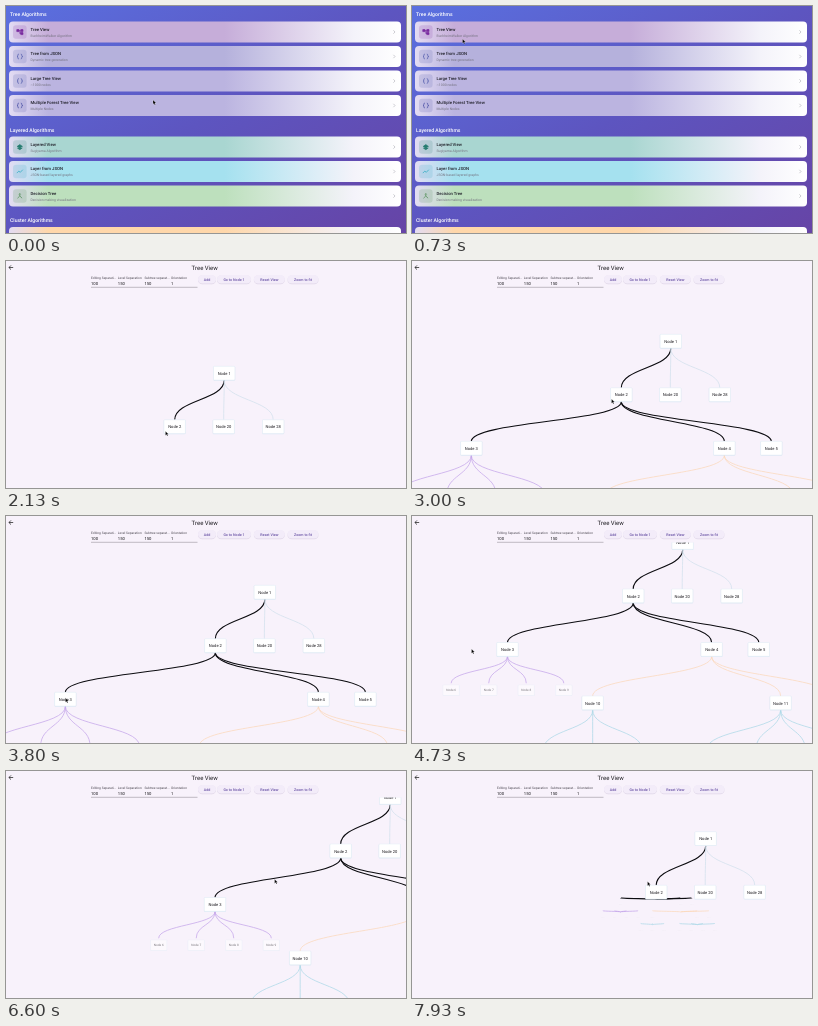
These frames come from a looping animation (400x227 px, 8000 ms). An HTML page:

```html
<!DOCTYPE html>
<html lang="en">
<head>
<meta charset="utf-8">
<title>Tree View</title>
<style>
  html, body { margin: 0; width: 100%; height: 100%; overflow: hidden; background: #f8f2fb; }
  svg { display: block; width: 100%; height: 100%; }
  text { font-family: Roboto, sans-serif; text-rendering: geometricPrecision; }
</style>
</head>
<body>
<svg id="stage" viewBox="0 0 400 227">
  <defs>
    <linearGradient id="sky" x1="0" y1="0" x2="1" y2="1">
      <stop offset="0" stop-color="#5a70e0"/>
      <stop offset=".5" stop-color="#5d55c0"/>
      <stop offset="1" stop-color="#6644a6"/>
    </linearGradient>
    <clipPath id="view"><rect y="26.5" width="400" height="201"/></clipPath>
  </defs>
  <g id="list"><rect width="400" height="227" fill="url(#sky)"/></g>
  <g id="page">
    <rect width="460" height="227" fill="#f8f2fb"/>
    <g clip-path="url(#view)"><g id="edges"></g><g id="nodes"></g></g>
    <path d="M7.2 6.5H3M5 4.4L2.9 6.5L5 8.6" fill="none" stroke="#222" stroke-width=".75"/>
  </g>
  <path id="cursor" d="M0 0V4.3L1 3.4L1.7 4.9L2.5 4.5L1.8 3.1H3.1Z" fill="#000" stroke="#fff" stroke-width=".25"/>
</svg>
<script>
const LOOP = 8000, TOGGLE = 550, LEVEL = 53.5;
const $ = id => document.getElementById(id);

function add(parent, tag, attrs, text) {
  const el = document.createElementNS('http://www.w3.org/2000/svg', tag);
  for (const key in attrs) el.setAttribute(key, attrs[key]);
  if (text) el.textContent = text;
  parent.appendChild(el);
  return el;
}

function label(parent, x, y, size, fill, text, extra) {
  return add(parent, 'text', { x, y, 'font-size': size, fill, ...extra }, text);
}

// Menu page
const icons = {
  tree: 'M-3-2.4h2.2v2h-2.2zM1-2.4h2.2v2H1zM1 .6h2.2v2H1zM-.8-1.4H1M.1-1.4V1.6H1',
  braces: 'M-1-2.4q-1 0-1 1v.6q0 .8-.8.8q.8 0 .8.8v.6q0 1 1 1M1-2.4q1 0 1 1v.6q0 .8.8.8q-.8 0-.8.8v.6q0 1-1 1',
  layers: 'M0-2.4L2.6-.6L0 1.2L-2.6-.6ZM-2.6 .9L0 2.7L2.6 .9',
  chart: 'M-3 1.6L-1-.4L.5 .8L3-1.8',
  split: 'M0-2.4V0L-2.3 2.2M0 0L2.3 2.2M-.8-1.6L0-2.4L.8-1.6'
};
const list = $('list');

function card(y, color, ink, icon, title, subtitle) {
  const id = 'card' + Math.round(y);
  const grad = add(list.ownerSVGElement.querySelector('defs'), 'linearGradient', { id });
  [[0, '#e3dcf3'], [.1, color], [.55, color], [.88, '#f4f3fa'], [1, '#fff']]
    .forEach(([offset, c]) => add(grad, 'stop', { offset, 'stop-color': c }));
  add(list, 'rect', { x: 3, y, width: 392, height: 21, rx: 4, fill: `url(#${id})` });
  if (!title) return;
  add(list, 'rect', { x: 7, y: y + 3.7, width: 13.6, height: 13.6, rx: 3, fill: ink, opacity: .17 });
  add(list, 'path', {
    d: icons[icon], transform: `translate(13.8 ${y + 10.5})`, 'stroke-width': .7,
    fill: icon === 'tree' || icon === 'layers' ? ink : 'none', stroke: ink
  });
  label(list, 24.5, y + 9.3, 4.25, '#1f1f28', title, { 'font-weight': 500 });
  label(list, 24.5, y + 15.2, 3.45, '#74727f', subtitle);
  add(list, 'path', { d: `M387.4 ${y + 8.8}l1.6 1.7l-1.6 1.7`, fill: 'none', stroke: '#a3a3ad', 'stroke-width': .55 });
}

[['Tree Algorithms', 10.3], ['Layered Algorithms', 125.5], ['Cluster Algorithms', 216]]
  .forEach(([text, y]) => label(list, 4, y, 5.1, '#fff', text, { 'font-weight': 500 }));
card(15.5, '#c6add9', '#7a2ba0', 'tree', 'Tree View', 'BuchheimWalker Algorithm');
card(40, '#b5b1dc', '#4a55a8', 'braces', 'Tree from JSON', 'Dynamic tree generation');
card(64.5, '#bbb4e0', '#4a55a8', 'braces', 'Large Tree View', '~1000 nodes');
card(89, '#bbb4e0', '#3f45a0', 'braces', 'Multiple Forest Tree View', 'Multiple Nodes');
card(130.5, '#a9d6d1', '#267c70', 'layers', 'Layered View', 'Sugiyama Algorithm');
card(155, '#a5e1ef', '#28a9bf', 'chart', 'Layer from JSON', 'JSON-based layered graphs');
card(179.5, '#bde0bd', '#4a8a50', 'split', 'Decision Tree', 'Decision making visualization');
card(221, '#ffd7aa');

// Graph page header
const page = $('page');
const middle = { 'text-anchor': 'middle' };
label(page, 198.7, 8.6, 6, '#1d1b20', 'Tree View', middle);
[['Editing Separati...', 85, '100'], ['Level Separation', 111.8, '150'],
 ['Subtree separat...', 138.4, '150'], ['Orientation', 165, '1']].forEach(([name, x, value]) => {
  label(page, x, 17.7, 3.25, '#49454f', name);
  label(page, x, 24, 4.2, '#1d1b20', value);
});
add(page, 'path', { d: 'M85 26.3H191.5', stroke: '#79747e', 'stroke-width': .45 });
[['Add', 201, 18], ['Go to Node 1', 228, 34], ['Reset View', 263.3, 31], ['Zoom to fit', 297, 31]]
  .forEach(([text, x, w]) => {
    add(page, 'rect', { x: x - w / 2, y: 14.6, width: w, height: 8.6, rx: 4.3, fill: '#d9d0e3', opacity: .8 });
    add(page, 'rect', { x: x - w / 2, y: 14, width: w, height: 8.6, rx: 4.3, fill: '#f3ecf9' });
    label(page, x, 19.7, 3.65, '#6750a4', text, { ...middle, 'font-weight': 500 });
  });

// Tree
const BLACK = '#0c0c10', PALE = '#d2e0ed', PURPLE = '#c5a6ea', ORANGE = '#fbd9bb', CYAN = '#add9e7';
const nodes = [];

function node(id, parent, dx, color, depth) {
  nodes.push({ id, parent: nodes.find(n => n.id === parent), dx, color, depth });
}

function row(first, parent, count, color, depth) {
  for (let i = 0; i < count; i++) node(first + i, parent, (i - (count - 1) / 2) * 49.3, color, depth);
}

node(1, 0, 0, BLACK, 0);
node(2, 1, -49.5, BLACK, 1);
node(20, 1, -.5, PALE, 1);
node(28, 1, 49, PALE, 1);
// Offsets under node 2 widen while node 3 is open.
node(3, 2, open => -48 - 102 * open, BLACK, 2);
node(4, 2, open => 103 * open, BLACK, 2);
node(5, 2, open => 47.5 + 102.5 * open, BLACK, 2);
row(6, 3, 4, PURPLE, 3);
node(10, 4, -119, ORANGE, 3);
node(11, 4, 69, ORANGE, 3);
node(12, 4, 118, ORANGE, 3);
row(13, 10, 3, CYAN, 4);
row(16, 11, 4, CYAN, 4);

[...nodes].sort((a, b) => b.depth - a.depth).forEach(n => {
  if (n.parent) n.edge = add($('edges'), 'path', {
    fill: 'none', stroke: n.color, 'stroke-width': n.color === BLACK ? 1.15 : .75
  });
  n.box = add($('nodes'), 'g', {});
  add(n.box, 'rect', { x: -11, y: -7, width: 22, height: 14.4, rx: 1, fill: '#cfe3f1', opacity: .55 });
  add(n.box, 'rect', { x: -10.7, y: -7, width: 21.4, height: 13.8, rx: .8, fill: '#fff', stroke: '#dbe8f3', 'stroke-width': .4 });
  label(n.box, 0, 1.5, 4.1, '#1d1b20', 'Node ' + n.id, middle);
});

// Motion
const ramp = (t, start, length = TOGGLE) => Math.min(1, Math.max(0, (t - start) / length));
const smooth = u => u * u * (3 - 2 * u);

function along(track, t) {
  let [, x, y] = track[0];
  for (let i = 1; i < track.length; i++) {
    const u = smooth(ramp(t, track[i - 1][0], track[i][0] - track[i - 1][0]));
    x += (track[i][1] - track[i - 1][1]) * u;
    y += (track[i][2] - track[i - 1][2]) * u;
  }
  return [x, y];
}

const pointer = [
  [100, 147, 94], [700, 50.5, 33], [1700, 50.5, 33], [2000, 141, 185], [2350, 199.5, 138],
  [3050, 199.5, 138], [3450, 59.5, 186], [3670, 59.5, 186], [4450, 59.5, 133], [5250, 59.5, 133],
  [5950, 210.5, 132], [6255, 210.5, 132], [6960, 330, 83], [7070, 330, 83], [7270, 363, 82.5],
  [7580, 363, 82.5], [7930, 235.5, 110.5]
];
const drags = [
  [2000, 150, 180.5], [2350, 209.3, 133.8], [3670, 209.3, 133.8], [4450, 210, 80],
  [7580, 210, 80], [7930, 95.2, 121.2]
];

function draw(t) {
  const slide = 1 - (1 - ramp(t, 810, 500)) ** 4.5;
  list.setAttribute('transform', `translate(${-133 * slide} 0)`);
  page.setAttribute('transform', `translate(${400 * (1 - slide)} 0)`);

  const closing = ramp(t, 4600), reopening = ramp(t, 6182);
  const spread = ramp(t, 810);
  const open2 = ramp(t, 2430) - ramp(t, 7512);
  const open3 = 1 - closing + reopening;
  const [x, y] = along(drags, t);

  for (const n of nodes) {
    const p = n.parent;
    if (!p) {
      n.x = x + 47 * closing + 102 * reopening + 49.5;
      n.y = y - LEVEL;
    } else {
      const grow = n.depth === 1 ? spread : p.id === 3 ? open2 * open3 : open2;
      const dx = p.id === 2 ? n.dx(open3) : n.dx;
      n.x = p.x + dx * grow;
      n.y = p.y + LEVEL * grow;
      n.scale = n.depth === 1 ? 1 : grow;
      const top = p.y + 7, end = n.y - 7, mid = (top + end) / 2;
      n.edge.setAttribute('d', `M${p.x} ${top}C${p.x} ${mid} ${n.x} ${mid} ${n.x} ${end}`);
      n.edge.setAttribute('opacity', grow > 0 ? 1 : 0);
    }
    const s = p ? n.scale : 1;
    n.box.setAttribute('transform', `translate(${n.x} ${n.y}) scale(${s})`);
    n.box.setAttribute('opacity', s * s);
  }
  $('cursor').setAttribute('transform', `translate(${along(pointer, t).join(' ')})`);
}

const began = performance.now();
function tick() {
  draw((performance.now() - began) % LOOP);
  requestAnimationFrame(tick);
}
tick();
</script>
</body>
</html>
```
